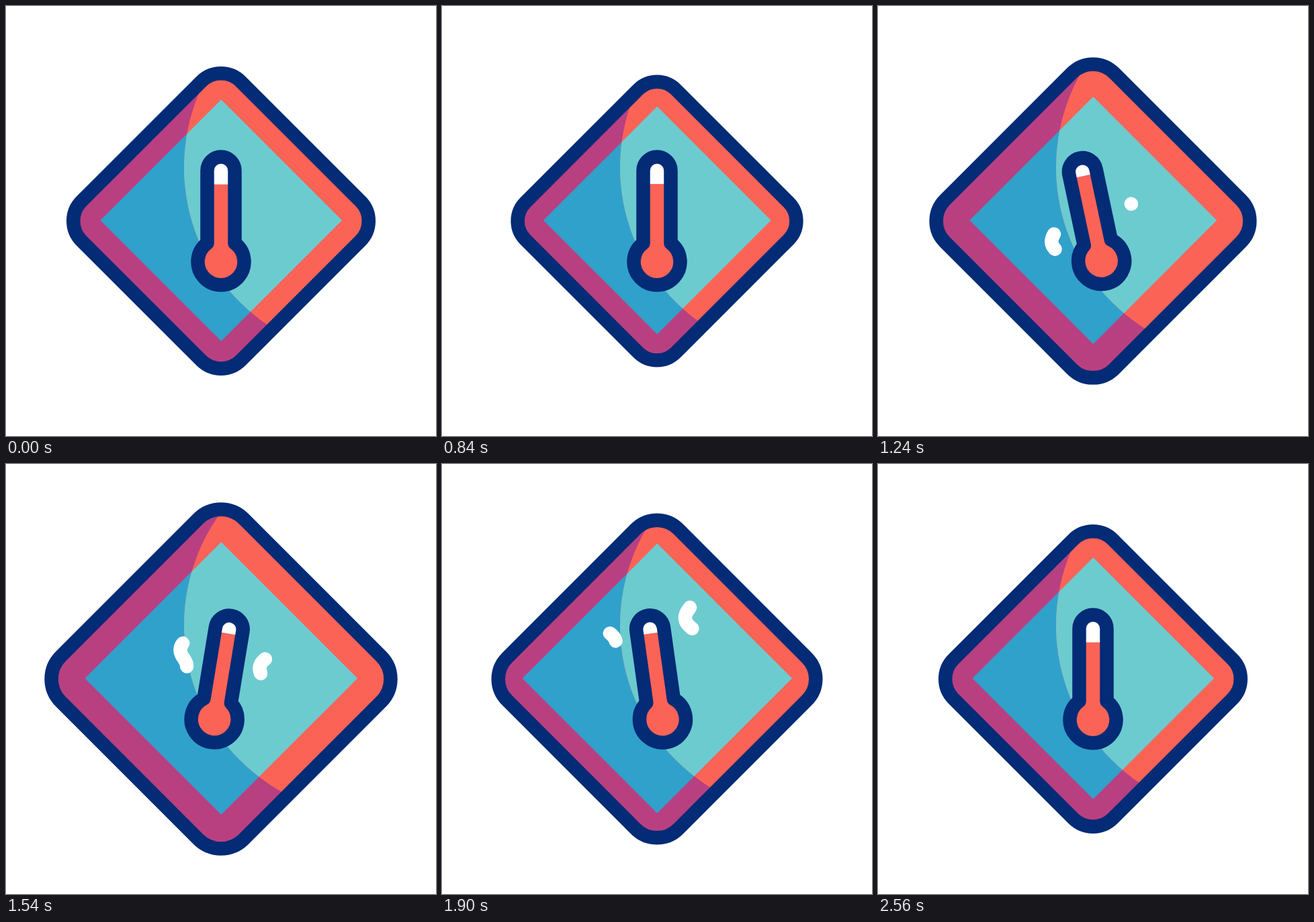
These frames come from a looping animation (640 px wide and 640 px high, 3000 ms). An HTML page:

```html
<!DOCTYPE html>
<html lang="en">
<head>
<meta charset="utf-8">
<title>Heat warning</title>
<style>
  html, body { margin: 0; width: 100%; height: 100%; overflow: hidden; background: #fff; }
  svg { display: block; width: 100%; height: 100%; }
  .navy { stroke: #032b76; stroke-width: 20.5; stroke-linejoin: round; }
  .wave { fill: none; stroke: #fff; stroke-width: 20.5; stroke-linecap: round; stroke-linejoin: round; }
</style>
</head>
<body>
<svg viewBox="0 0 640 640">
  <defs>
    <clipPath id="light"><circle cx="549" cy="240" r="284"/></clipPath>
    <clipPath id="tube">
      <path d="M299.5 353V245a20.5 20.5 0 0 1 41 0V353a34.5 34.5 0 1 1-41 0z"/>
    </clipPath>
  </defs>
  <g fill="#b84081"><rect class="plate" transform="rotate(45 320 320)"/></g>
  <path class="panel" fill="#30a1cb"/>
  <g clip-path="url(#light)">
    <rect class="plate" fill="#fc6357" transform="rotate(45 320 320)"/>
    <path class="panel" fill="#6ccbcf"/>
  </g>
  <rect class="plate navy" fill="none" transform="rotate(45 320 320)"/>
  <g id="swing">
    <path class="wave" pathLength="1" d="M260 354q-14-13.9 0-27.75t0-27.75t0-27.75t0-27.75"/>
    <path class="wave" pathLength="1" d="M381 307q-14-13.9 0-27.75t0-27.75t0-27.75t0-27.75"/>
    <g clip-path="url(#tube)">
      <rect x="290" y="220" width="60" height="200" fill="#fff"/>
      <rect id="fluid" x="280" width="80" height="200" fill="#fc6357"/>
    </g>
    <path class="navy" fill="none" d="M299.5 353V245a20.5 20.5 0 0 1 41 0V353a34.5 34.5 0 1 1-41 0z"/>
  </g>
</svg>
<script>
const LOOP = 3000;
const all = s => [...document.querySelectorAll(s)];
const plates = all('.plate'), panels = all('.panel'), waves = all('.wave');
const swing = document.getElementById('swing');
const fluid = document.getElementById('fluid');

// Keys are [time, value] pairs, eased in and out between neighbours.
const SIZE = [[200, 1], [788, 0.941], [1620, 1.154], [2172, 1]];
const TILT = [[860, 0], [1240, -12], [1620, 12], [2000, -12], [2380, 0]];
const LEVEL = [[200, 265.5], [600, 283.4], [1035, 251.5], [2160, 251.5], [2575, 265.5]];
const HEAD = [[930, 0], [1900, 1]];
const TAIL = [[1110, 0], [2110, 1]];
const PANEL_DELAY = 102, WAVE_DELAY = 300;

function at(keys, t) {
  if (t <= keys[0][0]) return keys[0][1];
  for (let i = 1; i < keys.length; i++) {
    const [t0, a] = keys[i - 1], [t1, b] = keys[i];
    if (t < t1) {
      const s = (t - t0) / (t1 - t0);
      return a + (b - a) * s * s * (3 - 2 * s);
    }
  }
  return keys[keys.length - 1][1];
}

function set(el, attrs) {
  for (const k in attrs) el.setAttribute(k, attrs[k]);
}

function draw(t) {
  const k = at(SIZE, t), half = 167.6 * k;
  for (const p of plates)
    set(p, { x: 320 - half, y: 320 - half, width: 2 * half, height: 2 * half, rx: 41.6 * k });

  const r = 179.8 * at(SIZE, t - PANEL_DELAY);
  for (const p of panels)
    set(p, { d: `M320.3 ${319 - r}l${r} ${r}l${-r} ${r}l${-r} ${-r}z` });

  set(swing, { transform: `rotate(${at(TILT, t)} 320 320)` });
  set(fluid, { y: at(LEVEL, t) });

  waves.forEach((w, i) => {
    const time = t - i * WAVE_DELAY;
    const head = at(HEAD, time), tail = at(TAIL, time);
    const shown = head > 0 && tail < 1;
    set(w, {
      visibility: shown ? 'visible' : 'hidden',
      'stroke-dasharray': `${Math.max(head - tail, 0.001)} 3`,
      'stroke-dashoffset': -Math.min(tail, 0.998)
    });
  });
}

const start = performance.now();
function tick() {
  draw((performance.now() - start) % LOOP);
  requestAnimationFrame(tick);
}
tick();
</script>
</body>
</html>
```
